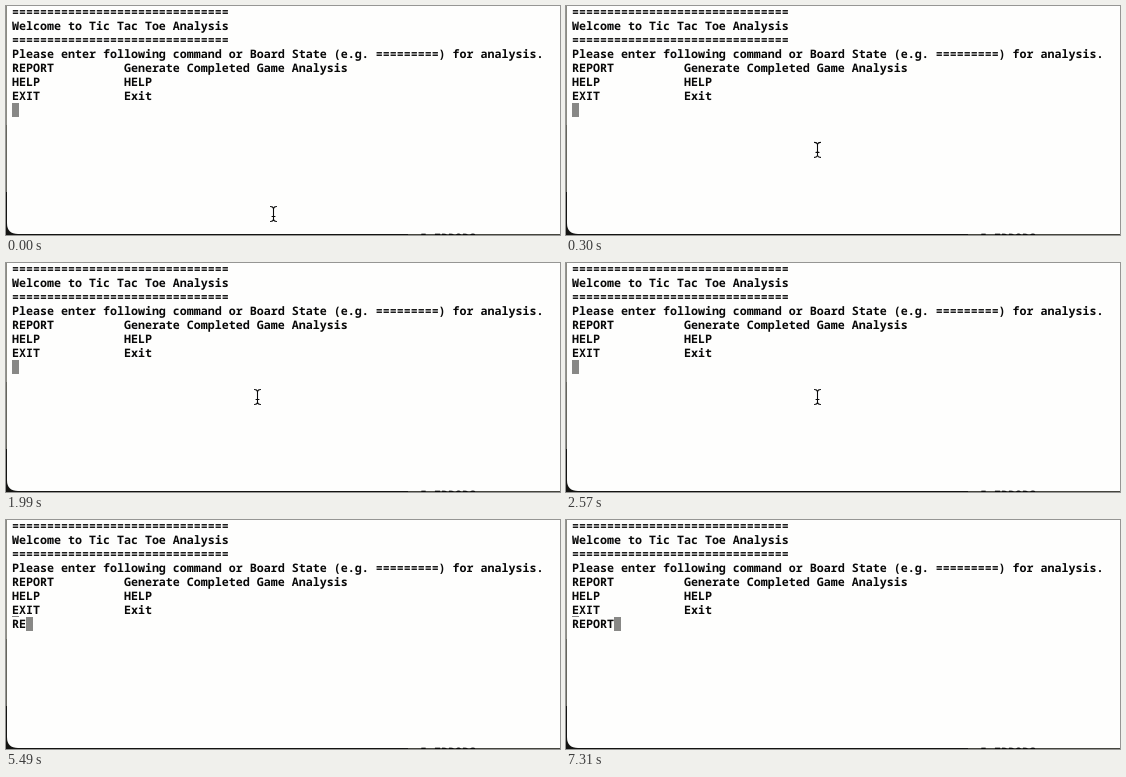
An HTML page that plays this animation: 554 px wide and 229 px high, repeating every 8 s.

```html
<!DOCTYPE html>
<html lang="en">
<head>
<meta charset="utf-8">
<title>Terminal</title>
<style>
  html, body { margin: 0; width: 100%; height: 100%; overflow: hidden; background: #fefefd; }
  svg { display: block; width: 100%; height: 100%; }
  text {
    font: 600 11.667px "Noto Sans Mono", "DejaVu Sans Mono", monospace;
    font-variant-ligatures: none;
    text-rendering: geometricPrecision;
    white-space: pre;
    fill: #080808;
  }
</style>
</head>
<body>
<svg viewBox="0 0 554 229">
  <!-- desktop behind the window -->
  <rect width="554" height="229" fill="#141412"/>
  <rect width="1" height="119" fill="#8c8c84"/>
  <rect y="119" width="1" height="67" fill="#66665e"/>
  <!-- window -->
  <path d="M1 0H554V228H12Q1 228 1 217Z" fill="#fefefd"/>
  <rect x="402" y="228" width="152" height="1" fill="#45453e"/>
  <text x="414" y="235.5">5 ERRORS</text>
  <g id="lines"></g>
  <rect id="mark" x="6" y="96" width="7" height="1" fill="#808080"/>
  <text id="typed" x="6" y="108"></text>
  <rect id="block" y="97" width="7" height="14" fill="#888886"/>
  <g id="pointer" fill="none" stroke-linecap="round" stroke-linejoin="round">
    <path id="halo" stroke="#fff" stroke-width="2.6"/>
    <path id="beam" stroke="#0a0a0a" stroke-width="1.1"/>
  </g>
</svg>
<script>
const LOOP = 8000, CELL = 7, LEFT = 6, LINE = 14;
const $ = id => document.getElementById(id);

const rule = "=".repeat(31);
const row = (cmd, info) => cmd.padEnd(16) + info;
const lines = [
  rule,
  "Welcome to Tic Tac Toe Analysis",
  rule,
  "Please enter following command or Board State (e.g. =========) for analysis.",
  row("REPORT", "Generate Completed Game Analysis"),
  row("HELP", "HELP"),
  row("EXIT", "Exit")
];
lines.forEach((str, i) => {
  const el = document.createElementNS("http://www.w3.org/2000/svg", "text");
  el.setAttribute("x", LEFT);
  el.setAttribute("y", 10 + i * LINE);
  el.textContent = str;
  $("lines").append(el);
});

const beam = "M-3 -7.5Q-.5 -7.5 0 -5.5Q.5 -7.5 3 -7.5M0 -5.5V5.5" +
             "M-3 7.5Q-.5 7.5 0 5.5Q.5 7.5 3 7.5M-1.5 2.5H1.5";
$("halo").setAttribute("d", beam);
$("beam").setAttribute("d", beam);

const word = "REPORT";
const keys = [5250, 5490, 5790, 6470, 6750, 7310];
const pointerGone = 5210;
// time, x, y of the mouse pointer
const path = [[20, 267.5, 208], [300, 251.5, 144], [500, 251.5, 134]];

function pointerAt(t) {
  if (t <= path[0][0]) return path[0].slice(1);
  for (let i = 1; i < path.length; i++) {
    const [t0, x0, y0] = path[i - 1], [t1, x1, y1] = path[i];
    if (t < t1) {
      const u = (t - t0) / (t1 - t0), k = u * (2 - u);
      return [x0 + (x1 - x0) * k, y0 + (y1 - y0) * k];
    }
  }
  return path[path.length - 1].slice(1);
}

const show = (id, on) => $(id).setAttribute("visibility", on ? "visible" : "hidden");

function draw(t) {
  const n = keys.filter(k => t >= k).length;
  $("typed").textContent = word.slice(0, n);
  $("block").setAttribute("x", LEFT + n * CELL);
  show("mark", n > 0);
  show("pointer", t < pointerGone);
  $("pointer").setAttribute("transform", `translate(${pointerAt(t)})`);
}

const start = performance.now();
function tick(now) {
  draw(Math.max(0, now - start) % LOOP);
  requestAnimationFrame(tick);
}
draw(0);
requestAnimationFrame(tick);
</script>
</body>
</html>
```
